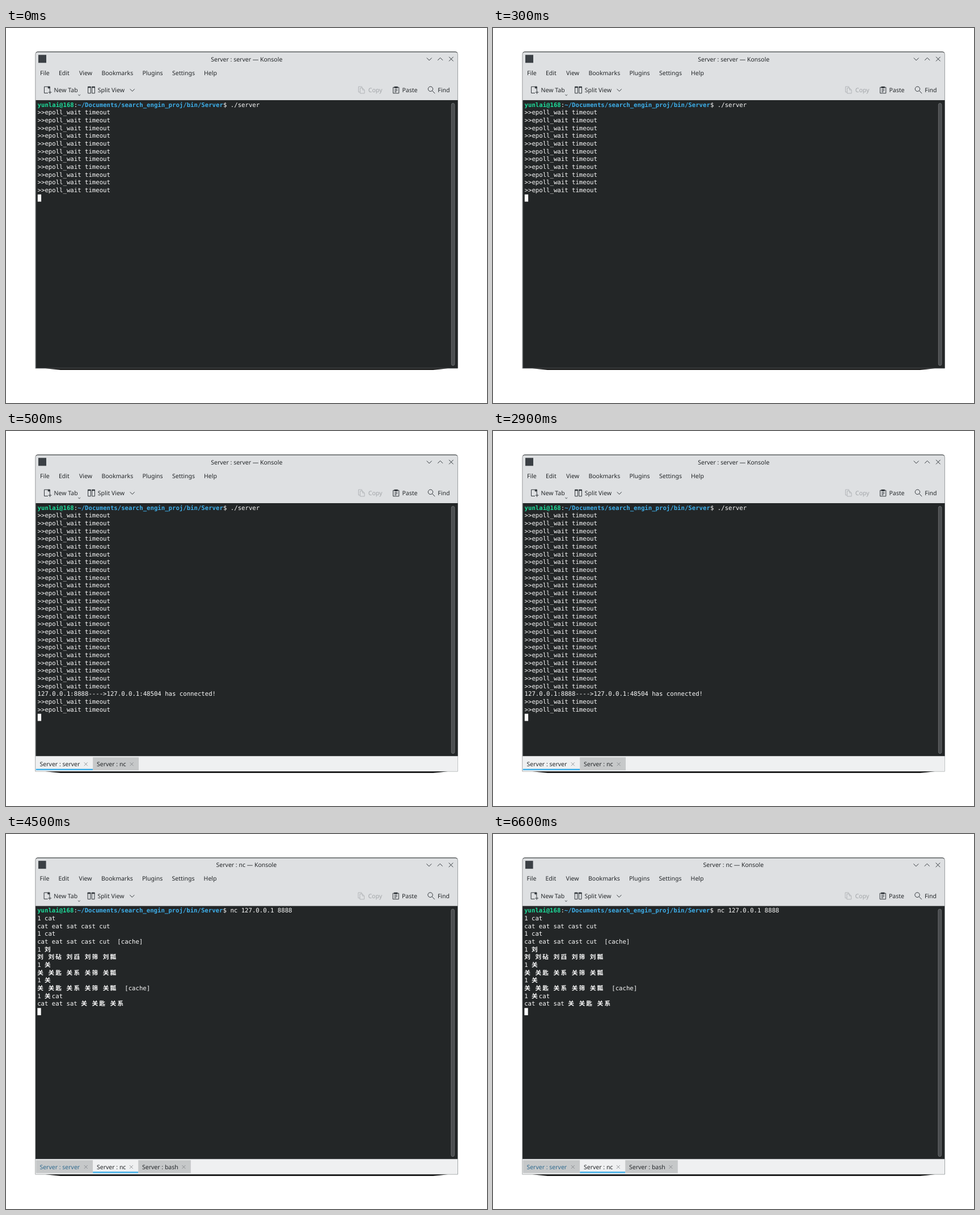
Recreate the animation shown at these times as an HTML page. Size 848 by 660 pixels, loop 8 s.

```html
<!DOCTYPE html>
<html lang="en">
<head>
<meta charset="utf-8">
<title>Terminal session</title>
<style>
  html, body { margin: 0; width: 100%; height: 100%; overflow: hidden; background: #fff; }
  svg { display: block; width: 848px; height: 660px; }
  text { white-space: pre; text-rendering: geometricPrecision; }
  .ui { font: 10.5px "Noto Sans", sans-serif; fill: #232629; }
  .mono { font: 10.66px "DejaVu Sans Mono", monospace; fill: #fcfcfc; }
  .cjk { font: bold 10.66px "Noto Sans CJK SC", "Noto Sans CJK", sans-serif; fill: #fcfcfc; }
  .user { font-weight: bold; fill: #1cdc9a; }
  .path { font-weight: bold; fill: #3daee9; }
  .icon { fill: none; stroke: #31363b; stroke-width: 1; }
  .dim { fill: #a2a5a8; }
  .icon.dim { fill: none; stroke: #b2b5b8; }
  .scene { visibility: hidden; animation: 8s step-end infinite; }
  #idle { animation-name: idle; }
  #linked { animation-name: linked; }
  #client { animation-name: client; }
  #chrome { animation: nudge 8s step-end infinite; }
  @keyframes idle { 0% { visibility: visible; } 6.25%, 100% { visibility: hidden; } }
  @keyframes linked { 0% { visibility: hidden; } 6.25% { visibility: visible; } 56.25%, 100% { visibility: hidden; } }
  @keyframes client { 0% { visibility: hidden; } 56.25%, 100% { visibility: visible; } }
  @keyframes nudge { 0% { transform: none; } 56.25%, 100% { transform: translate(-.4px, -.1px); } }
</style>
</head>
<body>
<svg viewBox="0 0 848 660">
  <path d="M65 598.6H783L769 600.2 753 601.8H96L80 600.2Z"/>
  <path d="M51.8 599V46q0-4 4-4H792.4q4 0 4 4V599Z" fill="#dee0e2" stroke="#85888a" stroke-width=".8"/>
  <path d="M53 43.6Q54 42 56 42H792Q794.5 42 795.6 43.6" fill="none" stroke="#2a2d2f" stroke-width=".9"/>
  <g id="chrome">
    <rect x="57" y="47.3" width="14" height="14" fill="#3b4045"/>
    <g class="icon">
      <path d="M741.8 52.6l4.4 4.4 4.4-4.4M761.2 56.8l4.4-4.4 4.4 4.4M781 50.8l7.6 7.6M788.6 50.8l-7.6 7.6"/>
      <path d="M74 114.5H67.5V103.3H77.2V110M77.5 110.2v5.8M74.6 113.1h5.8"/>
      <path d="M74.2 103.3h3v2.6h-3z" fill="#31363b"/>
      <path d="M127.3 117.2l1.9 1.7 1.9-1.7" stroke-width=".9"/>
      <path d="M144.6 103.3h4.7v11.5h-4.7zM151.7 103.3h4.7v11.5h-4.7z"/>
      <path d="M144.1 104.2h5.7M151.2 104.2h5.7" stroke-width="2.3"/>
      <path d="M218.7 107.4l4 4 4-4"/>
      <path d="M682.5 104.4h10.2v10.4h-10.2zM685 108h5.2M685 110.2h5.2M685 112.4h3.2"/>
      <path d="M684.5 104.4h6.2" stroke-width="3"/>
      <circle cx="748.4" cy="107.3" r="4.2"/>
      <path d="M751.4 110.4l4.8 4.8"/>
    </g>
    <path class="icon dim" d="M624 112.8H621.4V103.2H627.4V105.3M624.3 105.6H628.6L632 109V115H624.3ZM628.6 105.6V109H632"/>
    <g id="labels"></g>
  </g>
  <g id="idle" class="scene"></g>
  <g id="linked" class="scene"></g>
  <g id="client" class="scene" transform="translate(-.4 -.3)"></g>
</svg>
<script>
const CELL = 6.42, ROW = 13.65, LEFT = 55.6, BASE = 138.7;
const byId = id => document.getElementById(id);

function add(parent, tag, attrs, content = '') {
  const node = document.createElementNS('http://www.w3.org/2000/svg', tag);
  for (const key in attrs) node.setAttribute(key, attrs[key]);
  node.textContent = content;
  return parent.appendChild(node);
}
const box = (g, x, y, width, height, fill, more) => add(g, 'rect', { x, y, width, height, fill, ...more });
const label = (g, x, y, content, cls = 'ui', more) => add(g, 'text', { x, y, class: cls, ...more }, content);

// Each CJK character takes two cells.
function write(g, row, content, col = 0, cls = 'mono') {
  for (const run of content.match(/[\u4e00-\u9fff]|[^\u4e00-\u9fff]+/g)) {
    const wide = run.charCodeAt(0) > 0x4e00;
    label(g, LEFT + col * CELL, BASE + row * ROW, run, wide ? 'cjk' : cls);
    col += wide ? 2 : run.length;
  }
  return col;
}

function terminal(id, bottom, title, command, lines) {
  const g = byId(id);
  label(g, 424.3, 58.6, title + ' — Konsole', 'ui', { 'text-anchor': 'middle' });
  box(g, 52.5, 127, 744, bottom - 127, '#232627');
  box(g, 785.3, 132.5, 5.6, bottom - 137.3, '#4a4d4f', { rx: 2.8, stroke: '#76797a', 'stroke-width': .8 });
  let col = write(g, 0, 'yunlai@168', 0, 'mono user');
  col = write(g, 0, ':', col);
  col = write(g, 0, '~/Documents/search_engin_proj/bin/Server', col, 'mono path');
  write(g, 0, '$ ' + command, col);
  lines.forEach((line, i) => write(g, i + 1, line));
  box(g, 55.8, 129.1 + (lines.length + 1) * ROW, 6.3, 12.7, '#fcfcfc');
  return g;
}

function tabs(g, list) {
  box(g, 52.4, 572.4, 744, 26.4, '#eff0f1');
  box(g, 52.4, 572.2, 744, .8, '#c4c6c8');
  for (const { name, x, end, active, alert } of list) {
    box(g, x, 574.3, end - x, 22.8, active ? '#eff0f1' : '#c6c8c9');
    if (active) box(g, x, 594.6, end - x, 2.4, '#3daee9');
    label(g, x + 6.8, 590.4, name, 'ui', alert ? { style: 'fill:#2f6a8f' } : {});
    add(g, 'path', { d: `M${end - 15.4} 583.3l6 6m0-6l-6 6`, class: 'icon', style: 'stroke:#7d8184;stroke-width:.8' });
  }
}

const labels = byId('labels');
[['File', 60], ['Edit', 92.9], ['View', 129], ['Bookmarks', 168.4], ['Plugins', 240.4], ['Settings', 293], ['Help', 349]]
  .forEach(([name, x]) => label(labels, x, 82.6, name));
[['New Tab', 84.6], ['Split View', 161.8], ['Copy', 638.8, 'ui dim'], ['Paste', 698.4], ['Find', 761.3]]
  .forEach(([name, x, cls]) => label(labels, x, 113, name, cls));

const waits = n => Array(n).fill('>>epoll_wait timeout');

terminal('idle', 598.8, 'Server : server', './server', waits(11));

const linked = terminal('linked', 572.4, 'Server : server', './server',
  [...waits(23), '127.0.0.1:8888---->127.0.0.1:48504 has connected!', ...waits(2)]);
tabs(linked, [
  { name: 'Server : server', x: 52.8, end: 153.2, active: true },
  { name: 'Server : nc', x: 153.2, end: 234 }
]);

const client = terminal('client', 572.7, 'Server : nc', 'nc 127.0.0.1 8888', [
  '1 cat', 'cat eat sat cast cut',
  '1 cat', 'cat eat sat cast cut  [cache]',
  '1 刘', '刘 刘砧 刘舀 刘筛 刘瓢',
  '1 关', '关 关匙 关系 关筛 关瓢',
  '1 关', '关 关匙 关系 关筛 关瓢  [cache]',
  '1 关cat', 'cat eat sat 关 关匙 关系'
]);
tabs(client, [
  { name: 'Server : server', x: 53, end: 153.6, alert: true },
  { name: 'Server : nc', x: 153.6, end: 233.6, active: true },
  { name: 'Server : bash', x: 233.6, end: 326.2 }
]);
</script>
</body>
</html>
```
